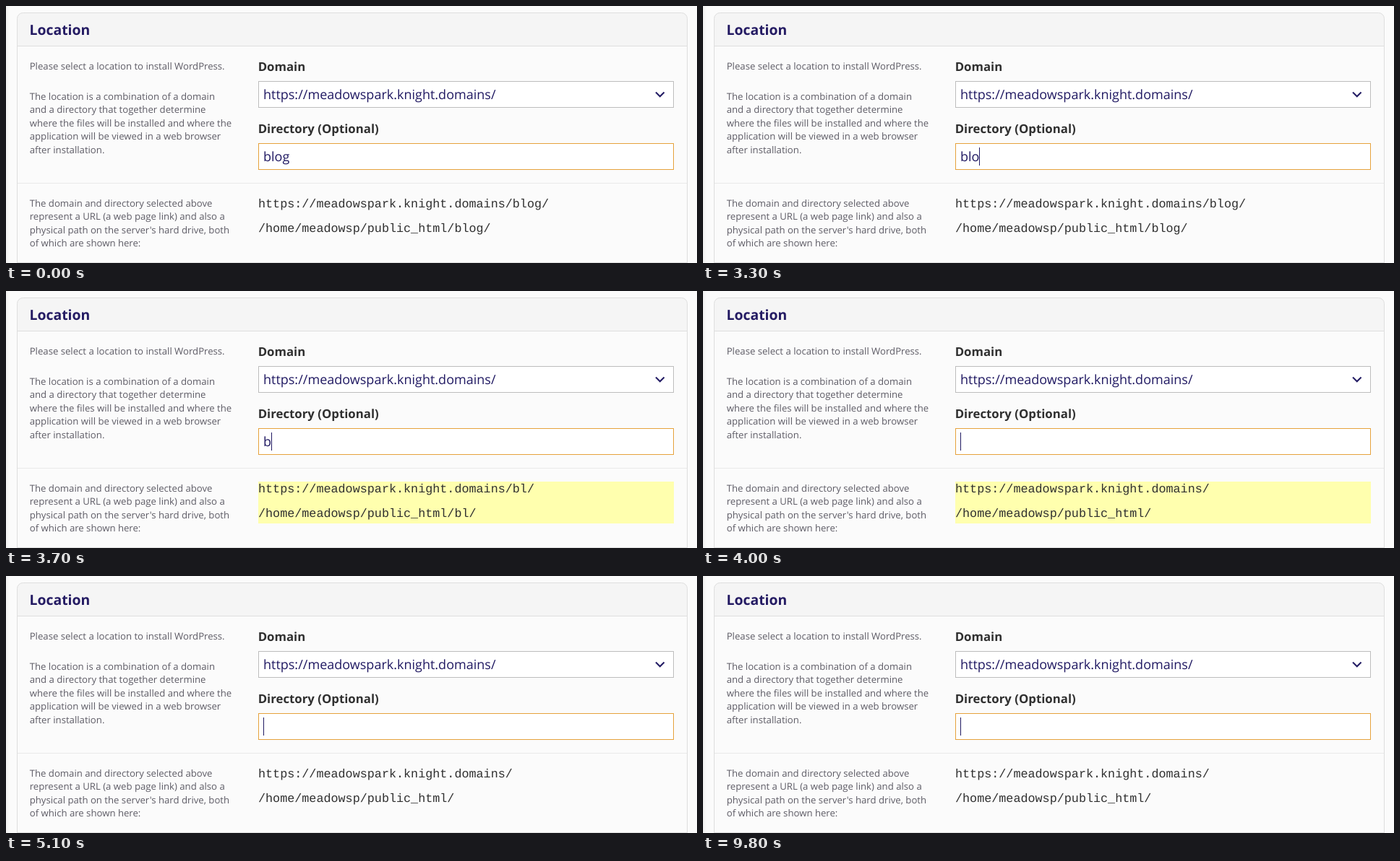
Write an HTML page that moves like this. It is 956x356 px and loops after 10 s.

```html
<!DOCTYPE html>
<html lang="en">
<head>
<meta charset="utf-8">
<title>Install location</title>
<style>
  html, body { margin: 0; width: 100%; height: 100%; overflow: hidden; background: #fbfbfb; }
  svg { display: block; width: 956px; height: 356px; }
  text { font-family: "Open Sans", sans-serif; text-rendering: geometricPrecision; white-space: pre; }
  .title { font-size: 19.4px; font-weight: 700; fill: #241b63; }
  .label { font-size: 16.8px; font-weight: 700; fill: #303030; }
  .note { font-size: 13.17px; fill: #5e5c66; }
  .value { font-size: 18px; fill: #211a63; }
  .path { font-family: "Liberation Mono", monospace; font-size: 16.75px; fill: #303030; }
  .line { fill: none; stroke: #dedede; }
</style>
</head>
<body>
<svg viewBox="0 0 956 356">
  <defs>
    <linearGradient id="edge">
      <stop offset="0" stop-color="#f1f1f1"/>
      <stop offset="1" stop-color="#fbfbfb"/>
    </linearGradient>
  </defs>
  <rect width="956" height="356" fill="#fbfbfb"/>
  <rect width="5" height="356" fill="url(#edge)"/>

  <path d="M15.5 55.5V17.5a8 8 0 0 1 8-8H934.5a8 8 0 0 1 8 8V55.5Z" fill="#f5f5f5"/>
  <path class="line" d="M15.5 356V17.5a8 8 0 0 1 8-8H934.5a8 8 0 0 1 8 8V356M15.5 55.5H942.5M15.5 355.5H942.5"/>
  <path class="line" d="M16 245.5H942" style="stroke:#e9e9e9"/>
  <text class="title" x="32.5" y="40">Location</text>

  <g id="notes"></g>

  <text class="label" x="348.7" y="90">Domain</text>
  <rect x="349.5" y="104.5" width="574" height="36" fill="#fff" stroke="#bdbdbd"/>
  <text class="value" x="356" y="129">https://meadowspark.knight.domains/</text>
  <path d="M899 119.5l5.8 5.8 5.8-5.8" fill="none" stroke="#211a63" stroke-width="2"/>

  <text class="label" x="348.7" y="176">Directory (Optional)</text>
  <rect x="349.5" y="190.5" width="574" height="36" fill="#fff" stroke="#e6a23c"/>
  <text class="value" id="field" x="356" y="215">blog</text>
  <rect id="caret" y="196" width="1" height="25" fill="#211a63" visibility="hidden"/>

  <rect id="glow" x="349" y="264" width="575" height="58" fill="#ffffae" opacity="0"/>
  <text class="path" id="url" x="349" y="279"></text>
  <text class="path" id="dir" x="349" y="313"></text>
</svg>
<script>
const LOOP = 10000, FADE = 700, LEADING = 18.45;
const $ = id => document.getElementById(id);

// Each entry: [time, value]; the latest one passed is in force.
const typed = [[0, "blog"], [3300, "blo"], [3500, "bl"], [3700, "b"], [3900, ""]];
const shown = [[0, "blog"], [3500, "blo"], [3700, "bl"], [3900, "b"], [4000, ""]];
const blinks = [500, 1100, 1600, 2200, 2800, 4500, 5100, 5700, 6200, 6800, 7400, 7900, 8500, 9100, 9800];

const notes = [
  [88, "Please select a location to install WordPress."],
  [130, "The location is a combination of a domain", "and a directory that together determine",
    "where the files will be installed and where the",
    "application will be viewed in a web browser", "after installation."],
  [278, "The domain and directory selected above", "represent a URL (a web page link) and also a",
    "physical path on the server's hard drive, both", "of which are shown here:"]
];

for (const [top, ...lines] of notes) {
  lines.forEach((line, i) => {
    const text = document.createElementNS("http://www.w3.org/2000/svg", "text");
    text.setAttribute("class", "note");
    text.setAttribute("x", 32.7);
    text.setAttribute("y", top + i * LEADING);
    text.textContent = line;
    $("notes").append(text);
  });
}

const latest = (steps, t) => steps.filter(([start]) => start <= t).pop();

function setText(id, text) {
  if ($(id).textContent !== text) $(id).textContent = text;
}

function draw() {
  const t = Math.floor(performance.now() % LOOP / 100) * 100;
  const [, input] = latest(typed, t);
  const [since, folder] = latest(shown, t);
  const tail = folder && folder + "/";

  setText("field", input);
  setText("url", "https://meadowspark.knight.domains/" + tail);
  setText("dir", "/home/meadowsp/public_html/" + tail);

  const caretOn = blinks.filter(b => b <= t).length % 2 === 1;
  $("caret").setAttribute("x", Math.floor(356 + $("field").getComputedTextLength()));
  $("caret").setAttribute("visibility", caretOn ? "visible" : "hidden");
  $("glow").setAttribute("opacity", since ? Math.max(0, 1 - (t - since) / FADE) : 0);

  requestAnimationFrame(draw);
}
draw();
</script>
</body>
</html>
```
